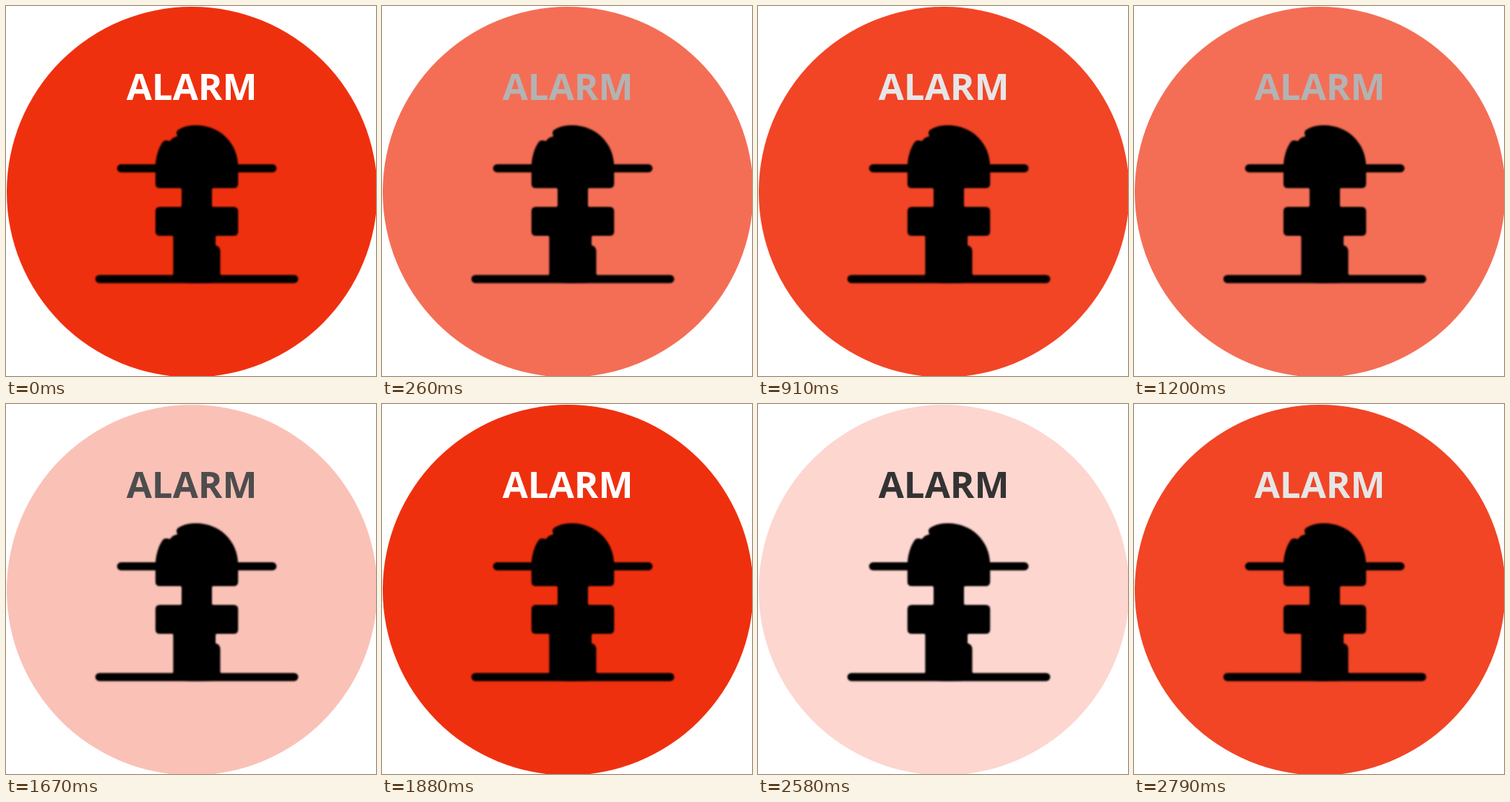
Recreate the animation shown at these times as an HTML page. Size 512 px wide and 512 px high, loop 2820 ms.

```html
<!DOCTYPE html>
<html lang="en">
<head>
<meta charset="utf-8">
<title>Alarm</title>
<style>
  html, body { margin: 0; height: 100%; overflow: hidden; background: #fff; }
  svg { display: block; width: 100%; height: 100%; }
  text { font: 700 51px "Open Sans", "Noto Sans", sans-serif; }
  #icon { filter: blur(0.9px); }
  .bar { stroke: #000; stroke-width: 11.2; stroke-linecap: round; }
</style>
</head>
<body>
<svg viewBox="0 0 512 512">
  <circle id="disc" cx="257.4" cy="257.4" r="256.4" fill="#ef300e"/>
  <text id="label" x="166.7" y="130" fill="#fff">ALARM</text>
  <g id="icon">
    <path class="bar" d="M159.2 224.6H368.8M129.2 377.8H398.8"/>
    <!-- lamp dome with a chipped left shoulder -->
    <path d="M206.8 222C207 208 212 194 217.5 187.5Q221 185 226.5 187L231 182.5L237.5 180
      Q234 175 238 171.5Q248 165 263 165C296 165 321 190 321.2 222V246
      Q321 252 315 252H287Q285 252 285 254V276Q285 278 287 278H315
      Q321.2 278 321.2 284V312Q321.2 318 315 318H292Q290 318 290 320V331
      Q296.5 333 296.5 339V371L299 374V382Q264 385 230 382V374L231.4 371V320
      Q231.4 318 230 318H213Q206.8 318 206.8 312V284Q206.8 278 213 278H241
      Q243 278 243 276V254Q243 252 241 252H213Q206.8 252 206.8 246Z"/>
  </g>
</svg>
<script>
  const HALF = 470, HOLD = 200, STEP = 30, STEPS = 10;
  const RED = [239, 48, 14], WHITE = [255, 255, 255], BLACK = [0, 0, 0];
  const disc = document.getElementById("disc");
  const label = document.getElementById("label");

  const mix = (a, b, k) =>
    `rgb(${a.map((v, i) => Math.round(v + (b[i] - v) * k))})`;

  // 0 = red disc with white text, 1 = white disc with black text
  function fade(ms) {
    const t = ms % (2 * HALF);
    const local = t % HALF;
    const k = local < HOLD ? 0 : (Math.floor((local - HOLD) / STEP) + 1) / STEPS;
    return t < HALF ? k : 1 - k;
  }

  function draw(ms) {
    const k = fade(ms);
    disc.setAttribute("fill", mix(RED, WHITE, k));
    label.setAttribute("fill", mix(WHITE, BLACK, k));
  }

  let start;
  function tick(now) {
    start ??= now;
    draw(now - start);
    requestAnimationFrame(tick);
  }
  requestAnimationFrame(tick);
</script>
</body>
</html>
```
